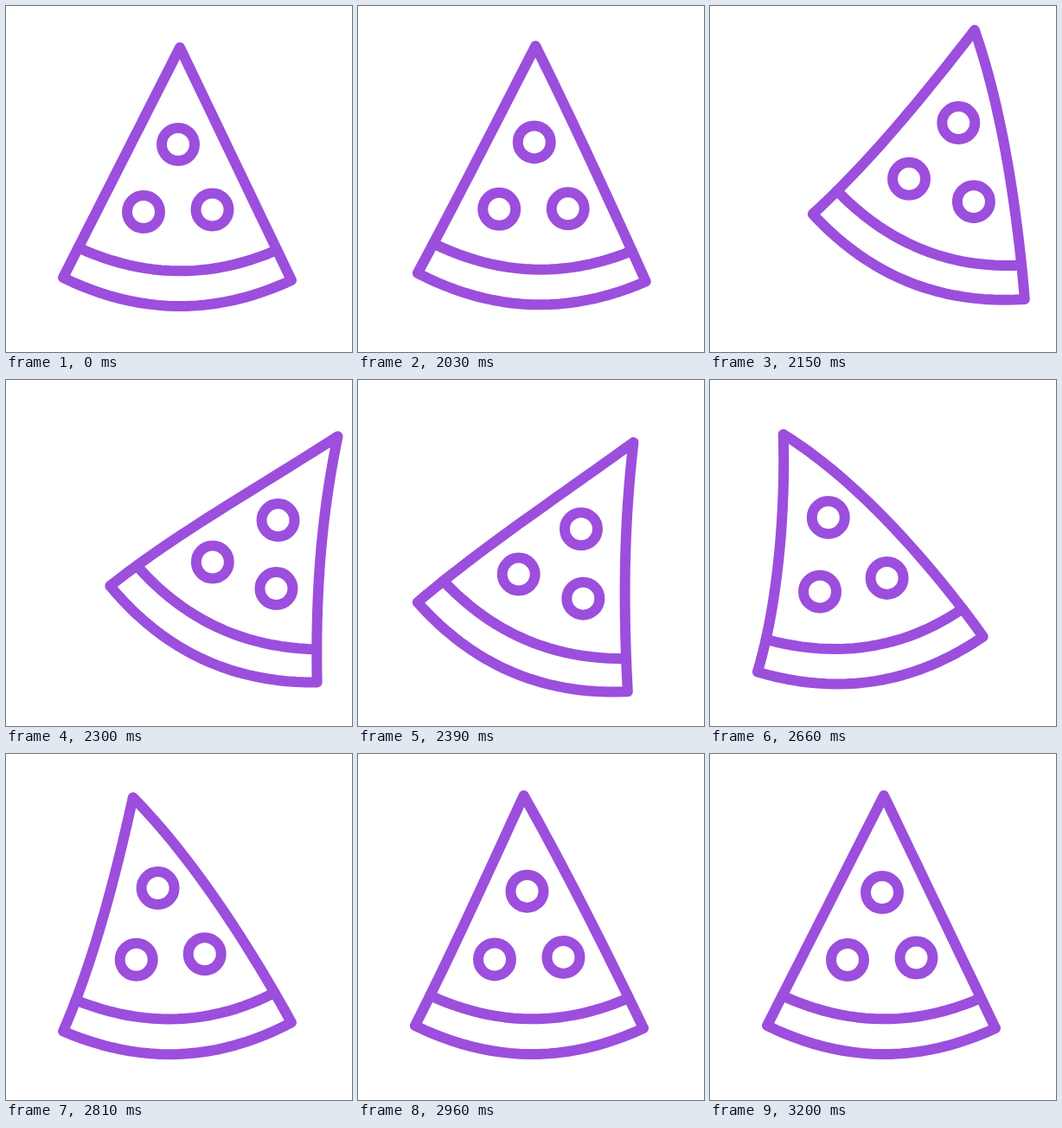
An HTML page for the animation above (3.23 s loop, 400 px wide and 400 px high).

```html
<!DOCTYPE html>
<html lang="en">
<head>
<meta charset="utf-8">
<title>Pizza slice</title>
<style>
  html, body { margin: 0; width: 100%; height: 100%; overflow: hidden; background: #fff; }
  svg { display: block; width: 100%; height: 100%; }
  svg * { fill: none; stroke: #9c4edd; stroke-width: 12; stroke-linecap: round; stroke-linejoin: round; }
</style>
</head>
<body>
<svg viewBox="0 0 400 400">
  <path id="slice"/>
  <path id="crust"/>
  <circle r="19"/><circle r="19"/><circle r="19"/>
</svg>
<script>
const LOOP = 3230, START = 2030, STEP = 30;

// The slice at rest
const TIP = [201, 48], LEFT = [66, 314], RIGHT = [330, 317];
const BASE = [198, 315.5], HEIGHT = BASE[1] - TIP[1];
const TOPPINGS = [[199, 160], [159, 238], [238.5, 235.5]];

// Each motion starts from zero at 2000 ms and eases through [time, value]
const MOVES = {
  x: [[2230, 60], [2490, -41], [2760, 0]],
  y: [[2200, -30.5], [2500, 3.5], [2800, 0]],
  turn: [[2210, 26.5], [2380, 22.5], [2650, -9.6], [2900, 0]],
  bend: [[2130, -40], [2320, 36], [2660, -60], [3060, 0]]
};

const slice = document.getElementById('slice');
const crust = document.getElementById('crust');
const circles = document.querySelectorAll('circle');

function ease(keys, t) {
  let from = 2000, value = 0;
  for (const [time, next] of keys) {
    const u = Math.min(Math.max((t - from) / (time - from), 0), 1);
    value += (next - value) * u * u * (3 - 2 * u);
    if (u < 1) break;
    from = time;
  }
  return value;
}

// Bends the slice sideways towards its tip, then turns and moves it
function warp([px, py], { x, y, turn, bend }) {
  const h = Math.max(0, (BASE[1] - py) / HEIGHT);
  const dx = px - BASE[0] + bend * h ** 1.8;
  const dy = py - BASE[1] + bend * h * h * (1 - h);
  const r = turn * Math.PI / 180, s = Math.sin(r), c = Math.cos(r);
  return [BASE[0] + x + dx * c - dy * s, BASE[1] + y + dx * s + dy * c];
}

const mix = (a, b, u) => a.map((p, i) => p + (b[i] - p) * u);

// Points from a to b, optionally curved towards c
function edge(a, b, c = mix(a, b, 0.5), n = 24) {
  return Array.from({ length: n + 1 }, (_, i) =>
    mix(mix(a, c, i / n), mix(c, b, i / n), i / n));
}

const OUTLINE = [
  ...edge(TIP, LEFT),
  ...edge(LEFT, RIGHT, [198, 378.5]),
  ...edge(RIGHT, TIP)
];
const CRUST = edge(mix(TIP, LEFT, 0.87), mix(TIP, RIGHT, 0.87), [199, 332]);

function draw(t) {
  const pose = {};
  for (const name in MOVES) pose[name] = ease(MOVES[name], t);

  const trace = points => 'M' + points.map(p =>
    warp(p, pose).map(n => n.toFixed(2)).join(' ')).join('L');
  slice.setAttribute('d', trace(OUTLINE) + 'Z');
  crust.setAttribute('d', trace(CRUST));

  TOPPINGS.forEach((p, i) => {
    const [cx, cy] = warp(p, pose);
    circles[i].setAttribute('cx', cx);
    circles[i].setAttribute('cy', cy);
  });
}

const origin = performance.now();
function tick() {
  const t = (performance.now() - origin) % LOOP;
  draw(t < START ? 0 : START + Math.floor((t - START) / STEP) * STEP);
  requestAnimationFrame(tick);
}
tick();
</script>
</body>
</html>
```
